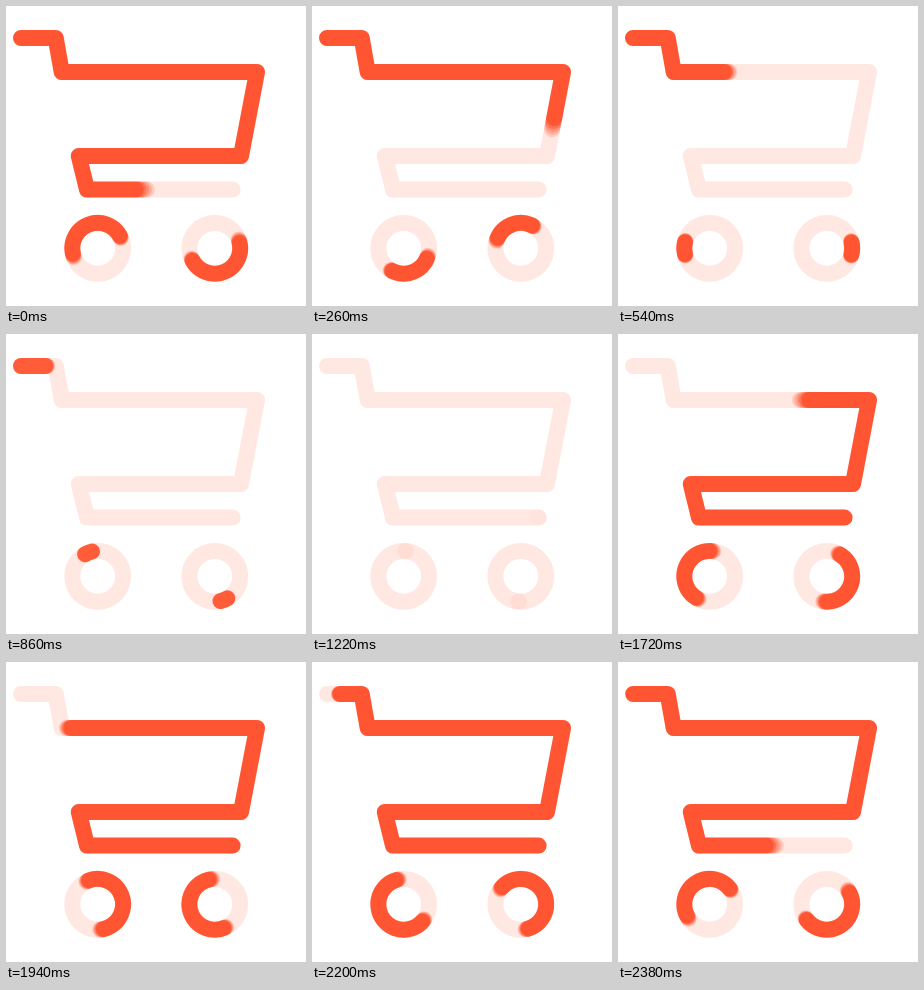
Animation of 300 by 300 pixels, one loop 2400 ms. Source, as an HTML page with a canvas:

```html
<!DOCTYPE html>
<html lang="en">
<head>
<meta charset="utf-8">
<title>Cart loader</title>
<style>
  html, body { margin: 0; width: 100%; height: 100%; overflow: hidden; background: #fff; }
  canvas { display: block; width: 300px; height: 300px; }
</style>
</head>
<body>
<canvas id="stage" width="300" height="300"></canvas>
<script>
const SIZE = 300, PERIOD = 2400, REST = 1155;
const COLOR = '#ff5533', TRACK = '#ffe8e2';
const SHUTTER = 12, SAMPLES = 5;
const RADIUS = 25.4, LINE = 16;

const basket = [[15, 32], [49.7, 32], [55.7, 66], [251, 66], [235, 150], [72.8, 150], [81, 183.6], [226.6, 183.6]];
const wheels = [{ x: 91.7, y: 242.3, turn: 270 }, { x: 208.8, y: 242.3, turn: 90 }];

// Wheel keys: time in ms, degrees
const rotationKeys = [[1140, 0], [1420, 35], [1720, 209], [2200, 489], [2390, 606], [2670, 837], [2940, 975], [3260, 1050], [3555, 1080]];
const sweepKeys = [[1190, 0], [1420, 55], [1720, 154], [2200, 216], [2390, 172], [2670, 95], [2940, 30], [3260, 17], [3555, 0]];

const clamp = (v) => Math.min(1, Math.max(0, v));

function bezier(x1, y1, x2, y2) {
  const at = (a, b, u) => 3 * a * u * (1 - u) ** 2 + 3 * b * u * u * (1 - u) + u ** 3;
  return (x) => {
    if (x <= 0 || x >= 1) return clamp(x);
    let lo = 0, hi = 1;
    for (let i = 0; i < 24; i++) {
      const mid = (lo + hi) / 2;
      if (at(x1, x2, mid) < x) lo = mid; else hi = mid;
    }
    return at(y1, y2, lo);
  };
}
const ease = bezier(0.25, 0.1, 0.25, 1);
const easeInOut = bezier(0.42, 0, 0.58, 1);

// Smooth curve through keys without overshoot
function curve(keys) {
  const rise = (i) => (keys[i + 1][1] - keys[i][1]) / (keys[i + 1][0] - keys[i][0]);
  const slopes = keys.map((_, i) => {
    if (i === 0 || i === keys.length - 1) return 0;
    const a = rise(i - 1), b = rise(i);
    return a * b > 0 ? 2 * a * b / (a + b) : 0;
  });
  return (t) => {
    const last = keys.length - 1;
    if (t <= keys[0][0]) return keys[0][1];
    if (t >= keys[last][0]) return keys[last][1];
    const i = keys.findIndex((k) => k[0] > t) - 1;
    const [t0, v0] = keys[i], [t1, v1] = keys[i + 1];
    const h = t1 - t0, u = (t - t0) / h, w = 1 - u;
    return w * w * (1 + 2 * u) * v0 + u * u * (3 - 2 * u) * v1
      + h * u * w * (w * slopes[i] - u * slopes[i + 1]);
  };
}
const rotation = curve(rotationKeys);
const sweep = curve(sweepKeys);

const length = basket.slice(1).reduce((sum, [x, y], i) =>
  sum + Math.hypot(x - basket[i][0], y - basket[i][1]), 0);

const basketPath = new Path2D();
basket.forEach(([x, y]) => basketPath.lineTo(x, y));

function setup(canvas, color) {
  const c = canvas.getContext('2d');
  c.lineWidth = LINE;
  c.lineCap = c.lineJoin = 'round';
  c.strokeStyle = color;
  return c;
}
const ctx = setup(document.getElementById('stage'), TRACK);
const layer = document.createElement('canvas');
layer.width = layer.height = SIZE;
const ink = setup(layer, COLOR);

function arc(c, wheel, from, degrees) {
  const start = from * Math.PI / 180;
  c.beginPath();
  c.arc(wheel.x, wheel.y, RADIUS, start, start + degrees * Math.PI / 180);
  c.stroke();
}

function drawTrack() {
  ctx.globalAlpha = 1;
  ctx.fillStyle = '#fff';
  ctx.fillRect(0, 0, SIZE, SIZE);
  ctx.stroke(basketPath);
  wheels.forEach((w) => arc(ctx, w, 0, 360));
}

function drawLines(t) {
  const start = length * (1 - ease((t - 1222) / 1186));
  const end = length * (1 - ease((t - 2236) / 1350));
  if (end - start > 0.01) {
    ink.setLineDash([end - start, 3 * length]);
    ink.lineDashOffset = -start;
    ink.stroke(basketPath);
    ink.setLineDash([]);
  }
  const degrees = sweep(t);
  if (degrees > 0.01) wheels.forEach((w) => arc(ink, w, w.turn + rotation(t), degrees));
}

function render(now) {
  let t = now % PERIOD;
  if (t < REST) t += PERIOD;

  // Average several moments for the soft moving ends
  ink.globalCompositeOperation = 'source-over';
  ink.clearRect(0, 0, SIZE, SIZE);
  ink.globalCompositeOperation = 'lighter';
  ink.globalAlpha = 1 / SAMPLES;
  for (let i = 0; i < SAMPLES; i++) drawLines(t + SHUTTER * (i / (SAMPLES - 1) - 0.5));

  drawTrack();
  const fromRest = Math.min(t - REST, REST + PERIOD - t);
  ctx.globalAlpha = easeInOut(clamp(fromRest / 350));
  ctx.drawImage(layer, 0, 0);
}

function frame() {
  render(performance.now());
  requestAnimationFrame(frame);
}
frame();
</script>
</body>
</html>
```
